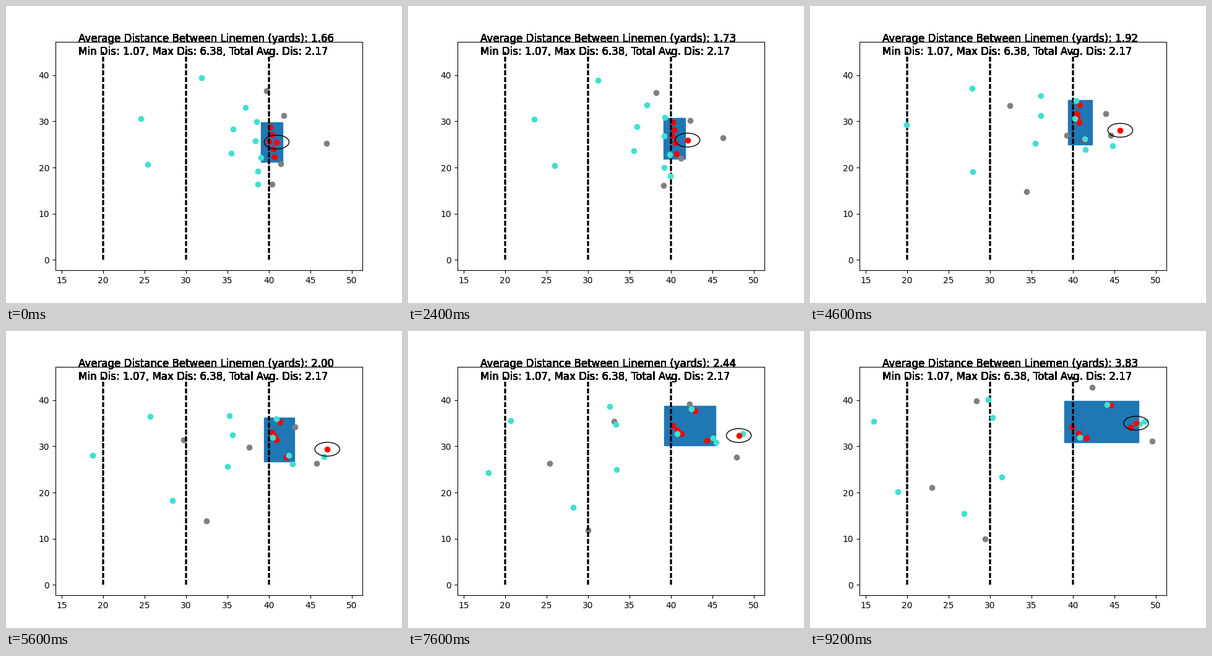
Animation, 640 px wide and 480 px high, one loop 9400 ms. Source, as a matplotlib script:

```python
import numpy as np
import matplotlib.pyplot as plt
from matplotlib.animation import FuncAnimation
from matplotlib.patches import Circle, Rectangle

FRAMES, INTERVAL = 47, 200
SNAP, RAMP = 12, 3  # frame of the snap, softness of the start
LAYERS = 22  # lines and text are overdrawn once per player
X_LIM, Y_LIM = (14.234, 51.277), (-2.25, 47.25)

# A route is three stage points: start, halfway and finish.
LINEMEN = [
    [(427, 196), (445, 145), (486, 120)],
    [(430, 208), (430, 162), (424, 155)],
    [(425, 219), (434, 168), (434.5, 165)],
    [(432, 231), (437, 174), (447, 173)],
    [(434, 244.5), (455, 201), (518, 156)],
]
RECEIVERS = [
    [(422, 137), (280, 179), (197, 253)],
    [(449, 177), (505, 214), (553, 178)],
    [(518, 222), (465, 151), (456, 91)],
    [(444, 255), (388, 184), (269, 113)],
    [(430, 288), (320, 308), (283, 336)],
]
DEFENDERS = [
    [(316, 116), (227, 139), (103, 146)],
    [(218, 182), (138, 203), (142, 260)],
    [(229, 256), (270, 275), (249, 295)],
    [(387, 164), (358, 135), (288, 111)],
    [(367, 199), (364, 166), (295, 140)],
    [(364, 238), (357, 219), (310, 236)],
    [(407, 267), (466, 212), (527, 149)],
    [(406, 288), (518, 199), (541, 146)],
]
PASSER = [[(437, 220), (522, 189), (527, 149)]]

# Rushers close in on every second lineman, then drift past him.
RUSH_GAP = np.array([(-6, -9), (-6, -1), (-6, 1)])
RUSH_DRIFT = np.array([(0, 8), (8, 8), (21, -7)])


def progress(t):
    """Rest before the snap, then steady running up to 1."""
    return RAMP * np.log1p(np.exp((t - SNAP) / RAMP)) / (FRAMES - 1 - SNAP)


def run(routes, u):
    """Parabola through the three points of each route."""
    start, half, finish = np.array(routes, float).transpose(1, 0, 2)
    return ((1 - u) * (1 - 2 * u) * start
            + 4 * u * (1 - u) * half
            + u * (2 * u - 1) * finish)


def rush(linemen, u):
    closing = np.array([-16, 0]) * np.exp(-14 * u)
    return linemen[::2] + RUSH_GAP + RUSH_DRIFT * u + closing


def to_yards(points):
    x, y = points.T
    return np.column_stack([
        X_LIM[0] + (x - 80) / 496 * (X_LIM[1] - X_LIM[0]),
        Y_LIM[0] + (427.2 - y) / 369.6 * (Y_LIM[1] - Y_LIM[0]),
    ])


fig, ax = plt.subplots(figsize=(6.4, 4.8), dpi=100)
ax.set_xlim(X_LIM)
ax.set_ylim(Y_LIM)

box = ax.add_patch(Rectangle((0, 0), 1, 1, color="tab:blue"))
line_dots = ax.scatter([], [], c="red")
receiver_dots = ax.scatter([], [], c="gray")
defender_dots = ax.scatter([], [], c="turquoise", zorder=2.4)
passer_dot = ax.scatter([], [], c="red", zorder=2.4)
ring = ax.add_patch(Circle((0, 0), 1.5, fill=False, lw=1, zorder=2.4))

labels = []
for _ in range(LAYERS):
    for yard in (20, 30, 40):
        ax.plot([yard, yard], [0, 45], "k--", lw=1.5,
                scalex=False, scaley=False)
    labels.append(ax.text(17, 44.4, "", fontsize=12))


def update(t):
    u = progress(t)
    linemen = run(LINEMEN, u)
    defenders = np.vstack([run(DEFENDERS, u), rush(linemen, u)])
    line, passer = to_yards(linemen), to_yards(run(PASSER, u))

    line_dots.set_offsets(line)
    receiver_dots.set_offsets(to_yards(run(RECEIVERS, u)))
    defender_dots.set_offsets(to_yards(defenders))
    passer_dot.set_offsets(passer)
    ring.center = passer[0]

    low, high = line.min(axis=0) - 1, line.max(axis=0) + 1
    box.set_bounds(*low, *(high - low))

    spacing = np.hypot(*np.diff(line, axis=0).T).mean()
    for label in labels:
        label.set_text(
            f"Average Distance Between Linemen (yards): {spacing:.2f}\n"
            "Min Dis: 1.07, Max Dis: 6.38, Total Avg. Dis: 2.17")
    return [box, ring, *labels]


anim = FuncAnimation(fig, update, frames=FRAMES, interval=INTERVAL,
                     repeat=True, repeat_delay=0, blit=False)
plt.show()
```
